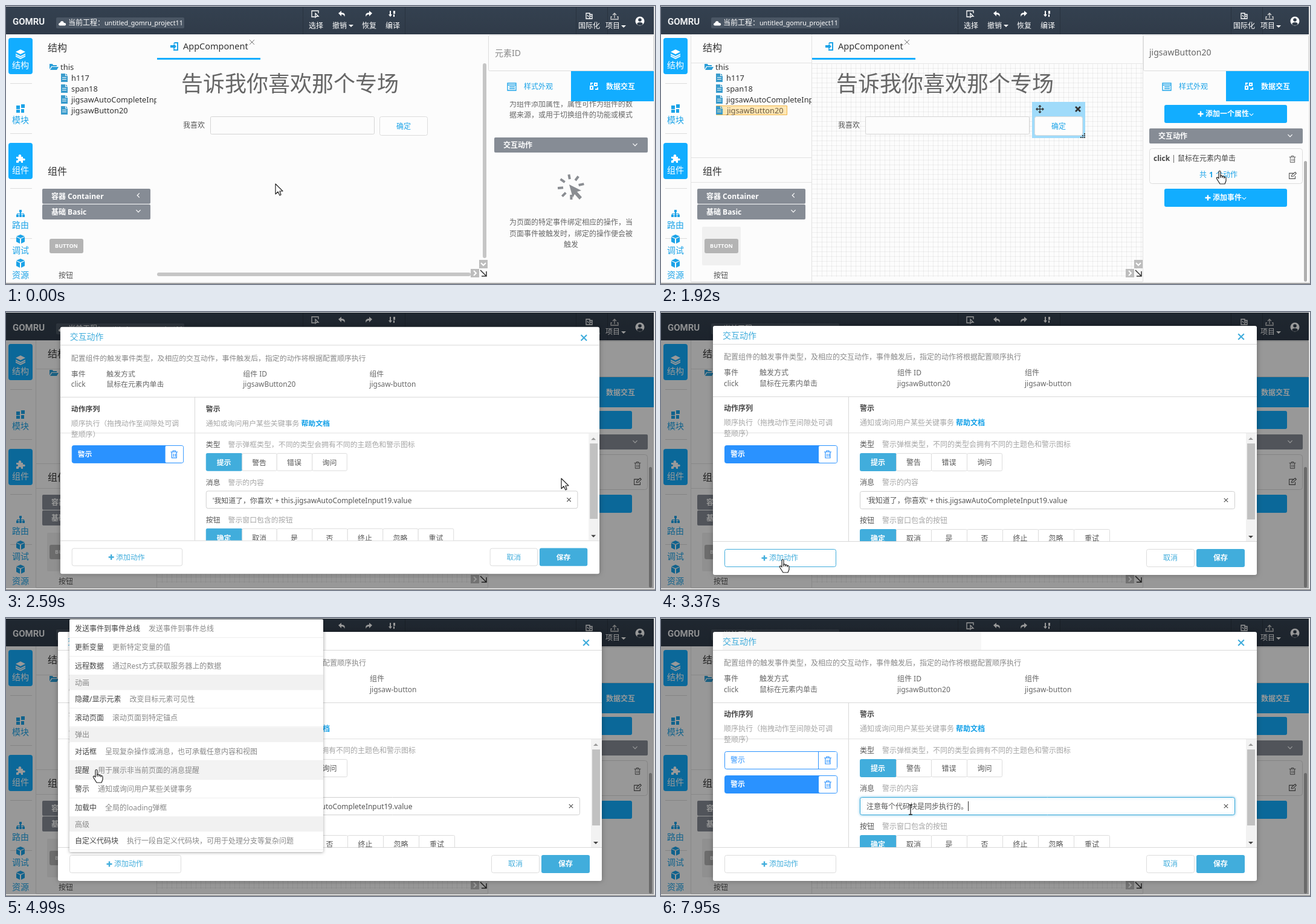
These frames come from a looping animation (1074x461 px, 8 s). An HTML page with a canvas:

```html
<!DOCTYPE html>
<html lang="zh-CN">
<head>
<meta charset="utf-8">
<title>交互动作</title>
<style>
html, body { margin: 0; width: 100%; height: 100%; overflow: hidden; background: #fcfcfc; }
canvas { display: block; width: 1074px; height: 461px; }
</style>
</head>
<body>
<canvas id="stage" width="1074" height="461"></canvas>
<script>
const c = document.getElementById('stage').getContext('2d');
const LOOP = 8000;
const FONT = '"Noto Sans", "Noto Sans CJK SC", "Noto Sans CJK", sans-serif';
const BLUE = '#12adff', SKY = '#41addc', ACTION = '#2a92ff', LINE = '#dcdcdc', TEXT = '#555', PALE = '#a5a5a5';

const clamp = v => Math.max(0, Math.min(1, v));
const span = (t, a, b) => clamp((t - a) / (b - a));
const smooth = p => p * p * (3 - 2 * p);

function box(x, y, w, h, fill, r = 0, stroke) {
  c.beginPath();
  const o = stroke ? .5 : 0;
  c.roundRect(x + o, y + o, w - 2 * o, h - 2 * o, r);
  if (fill) { c.fillStyle = fill; c.fill(); }
  if (stroke) { c.strokeStyle = stroke; c.lineWidth = 1; c.stroke(); }
}
const hline = (x1, x2, y, color = LINE) => box(x1, y, x2 - x1, 1, color);
const vline = (x, y1, y2, color = LINE) => box(x, y1, 1, y2 - y1, color);

function text(s, x, y, size = 12, color = TEXT, weight = 400, align = 'left') {
  c.font = `${weight} ${size}px ${FONT}`;
  c.fillStyle = color;
  c.textAlign = align;
  c.fillText(s, x, y + size * .37);
  return c.measureText(s).width;
}
const mid = (s, x, y, size, color, weight) => text(s, x, y, size, color, weight, 'center');

function clipped(x, y, w, h, draw) {
  c.save();
  c.beginPath();
  c.rect(x, y, w, h);
  c.clip();
  draw();
  c.restore();
}

// Icon paths are centred on 0,0.
const ICON = {
  layers: 'M0-7L8-3L0 1L-8-3ZM-8 0L0 4L8 0V2L0 6L-8 2ZM-8 3L0 7L8 3V5L0 9L-8 5Z',
  blocks: 'M-7-5H-1V1H-7ZM1-7H7V-1H1ZM-7 2H-1V7H-7ZM1 1H6V7H1Z',
  puzzle: 'M-7-3H-3C-5-8 3-8 1-3H4V0C9-2 9 5 4 3V7H1C2 3-4 3-3 7H-7V3C-3 4-3-1-7 0Z',
  tree: 'M-2-6H2V-2H1V0H6V2H7V6H3V2H5V1H1V2H2V6H-2V2H-1V1H-5V2H-3V6H-7V2H-6V0H-1V-2H-2Z',
  cube: 'M0-8L7-5L0-2L-7-5ZM-7-4L-1-1V7L-7 4ZM7-4L1-1V7L7 4Z',
  folder: 'M-7-5H-2L-1-3H5V-1H-4L-7 4ZM-3 0H8L5 5H-6Z',
  file: 'M-5-7H2V-3H6V7H-5ZM3-7L6-4H3ZM-3-1V0H4V-1ZM-3 2V3H4V2Z',
  cloud: 'M-4 4C-8 4-7-1-4-1C-3-6 3-5 3-1C8-2 8 4 4 4Z',
  undo: 'M-6-1L-1-5V-2C4-2 6 1 4 5C4 2 2 1-1 1V4Z',
  caret: 'M-4-2H4L0 2Z',
  caretUp: 'M-4 2H4L0-2Z',
  compile: 'M-4-5H-2V1H0L-3 5L-6 1H-4ZM2-5H5V0H2ZM2 1H4V5H2Z',
  door: 'M0-7H6V7H-2V4H0V5H4V-5H0V-3H-2V-5ZM-7-2H-2V-5L3 0L-2 5V2H-7Z',
  plus: 'M-1.2-4.5H1.2V-1.2H4.5V1.2H1.2V4.5H-1.2V1.2H-4.5V-1.2H-1.2Z',
  arrow: 'M0 0V17L4 13L7 19L9 18L7 12H12Z',
  hand: 'M-2 1C-2-1 1-1 1 1V8C3 6 4 8 4 9C6 7 7 9 7 10C9 9 10 10 10 12V16L8 21H0L-5 13C-7 10-4 9-2 12Z'
};
const LINES = {
  chevron: 'M-4-2L0 2L4-2',
  back: 'M2-4L-2 0L2 4',
  cross: 'M-4-4L4 4M4-4L-4 4',
  trash: 'M-6-4H6M-2-4V-6H2V-4M-4-4V6H4V-4M-1-1V4M2-1V4',
  edit: 'M3-4H-6V6H5V1M-2 2L-1-1L5-6L7-4L1 2Z',
  move: 'M-6 0H6M0-6V6M-2-4L0-6L2-4M-2 4L0 6L2 4M-4-2L-6 0L-4 2M4-2L6 0L4 2',
  select: 'M5-1V-5H-6V5H-1M0-1V6L2 4H5Z',
  upload: 'M0 3V-5M-3-2L0-5L3-2M-4 1H-6V5H6V1H4',
  locale: 'M-5-4H1V5H-5ZM1-2H5V5H1M-3-1L-1 2M2 1H4',
  list: 'M-7-6H7V6H-7ZM-7-3H7M-4 0H5M-4 3H5',
  swap: 'M-6 0H-2V5H-6ZM1-5H5V-1H1ZM-5-2V-5H-2M6 2V5H2'
};
function icon(name, x, y, color, size = 1, width = 1.3) {
  c.save();
  c.translate(x, y);
  c.scale(size, Math.abs(size));
  if (ICON[name]) {
    c.fillStyle = color;
    c.fill(new Path2D(ICON[name]), 'evenodd');
  } else {
    c.strokeStyle = color;
    c.lineWidth = width;
    c.stroke(new Path2D(LINES[name]));
  }
  c.restore();
}

function header() {
  const g = c.createLinearGradient(0, 0, 0, 47);
  g.addColorStop(0, '#344150');
  g.addColorStop(1, '#303b49');
  box(0, 0, 1074, 47, g);
  c.font = '700 15px Roboto, sans-serif';
  c.textAlign = 'left';
  c.fillStyle = '#eceef0';
  c.fillText('GOMRU', 11, 31);
  box(83, 19, 212, 18, '#4a5664', 2);
  icon('cloud', 93, 29, '#fff', .9);
  text('当前工程：', 103, 28, 12, '#fff');
  text('untitled_gomru_project11', 163, 28, 10.7, '#fff');
  for (const x of [491, 660, 943, 995]) vline(x, 2, 47, '#29333f');
  icon('select', 512, 13, '#fff');
  icon('undo', 556, 13, '#fff');
  icon('undo', 600, 13, '#fff', -1);
  icon('compile', 639, 13, '#fff');
  icon('locale', 965, 16, '#fff');
  icon('upload', 1007, 17, '#ccc');
  [['选择', 501], ['撤销', 540], ['恢复', 589], ['编译', 628], ['国际化', 947], ['项目', 992]]
    .forEach(([s, x]) => text(s, x, 33, 12, '#fff'));
  icon('caret', 571, 33, '#fff');
  icon('caret', 1022, 34, '#fff');
  c.fillStyle = '#fff';
  c.beginPath(); c.arc(1049, 25, 7.5, 0, 7); c.fill();
  c.fillStyle = '#323d4b';
  c.beginPath(); c.arc(1049, 23, 2.8, 0, 7); c.fill();
  c.beginPath(); c.ellipse(1049, 29.5, 4.6, 2.6, 0, 0, 7); c.fill();
}

function sidebar() {
  box(4, 53, 40, 60, BLUE, 4);
  box(4, 227, 40, 60, BLUE, 4);
  for (const y of [128, 211, 302, 385]) hline(7, 43, y);
  [['layers', 79, '结构', 98, 1], ['blocks', 170, '模块', 189], ['puzzle', 253, '组件', 272, 1],
   ['tree', 344, '路由', 363], ['cube', 387, '调试', 405], ['cube', 427, '资源', 446]]
    .forEach(([name, y, label, ty, on]) => {
      icon(name, 24, y, on ? '#fff' : '#1ba3e8');
      mid(label, 24, ty, 14, on ? '#fff' : '#1ba3e8');
    });
}

function treePanel(t) {
  text('结构', 69, 69, 16, '#333');
  icon('folder', 79, 101, '#2c9fd8');
  text('this', 90, 101, 13, '#333');
  const picked = t >= 1020, hover = t > 360 && t < 1230;
  if (picked) box(91, 165, 118, 16, '#ffe7b4', 0, '#f1b548');
  clipped(50, 95, 199, 90, () => ['h117', 'span18', 'jigsawAutoCompleteInput19', 'jigsawButton20']
    .forEach((s, i) => {
      const y = 119 + 18 * i;
      icon('file', 96, y, '#3a9ccd');
      const w = text(s, 108 + (picked && i == 3), y, 12.8, picked && i == 3 ? '#6b5d45' : '#333');
      if (hover && i == 3) hline(109, 109 + w, y + 7, '#666');
    }));
  text('组件', 69, 274, 16, '#333');
  [['容器 Container', 303, 'back'], ['基础 Basic', 329, 'chevron']].forEach(([s, y, mark]) => {
    box(60, y, 179, 25, '#868c95', 2);
    text(s, 75, y + 13, 12, '#fff', 600);
    icon(mark, 219, y + 11, '#fff', .9);
  });
}

function rightPanel(t) {
  const picked = t >= 1020;
  box(798, 48, 274, 60, '#fcfcfc', 2, LINE);
  t >= 1150 ? text('jigsawButton20', 808, 77, 14, '#666') : text('元素ID', 809, 78, 14, '#888');
  if (!picked) {
    clipped(799, 158, 270, 60, () => {
      mid('为组件添加属性，属性可作为组件的数', 935, 163, 12, '#666');
      mid('据来源，或用于切换组件的功能或模式', 935, 181, 12, '#666');
    });
    c.strokeStyle = '#8a8d92';
    c.lineWidth = 4;
    for (let i = 2; i < 9; i++) {
      const a = i * .75 + .05, x = Math.cos(a), y = Math.sin(a);
      c.beginPath();
      c.moveTo(935 + x * 13, 300 + y * 13);
      c.lineTo(935 + x * 22, 300 + y * 21);
      c.stroke();
    }
    c.fillStyle = '#8a8d92';
    c.fill(new Path2D('M932 296L952 306L945 308L953 317L949 321L941 312L938 318Z'));
    ['为页面的特定事件绑定相应的操作，当', '页面事件被触发时，绑定的操作便会被', '触发']
      .forEach((s, i) => mid(s, 935, 359 + 18.4 * i, 12, '#666'));
  } else {
    [['添加一个属性', 164], ['添加事件', 303]].forEach(([s, y], i) => {
      const color = t < 1150 && !i ? '#333' : '#fff';
      box(833, y, 203, 30, BLUE, 3);
      icon('plus', i ? 905 : 893, y + 15, color);
      const x = i ? 913 : 901, w = text(s, x, y + 15, 12, color, 600);
      icon('chevron', x + w + 4, y + 16, color, .8);
    });
    box(808, 236, 254, 59, '#fcfcfc', 4, LINE);
    let x = 815 + text('click', 815, 253, 12, '#444', 600);
    x += text(' | ', x, 253, 12, '#555');
    text('鼠标在元素内单击', x, 253, 12, '#444');
    text('共', 891, 280, 12, '#1ba3e8');
    text('1', 907, 280, 12, '#1ba3e8', 700);
    text('个动作', 918, 280, 12, '#1ba3e8');
    icon('trash', 1045, 254, '#555', .9, 1);
    icon('edit', 1045, 281, '#555', .9, 1.2);
    if (t >= 1150) box(1064, 257, 5, 200, '#b0b0b0', 3);
  }
  const y = picked ? 203 : 218;
  box(808, y, 254, 25, '#868c95', 2);
  text('交互动作', 823, y + 13, 12, '#fff', 600);
  icon('chevron', 1041, y + 12, '#fff', .9);
  box(935, 108, 137, 50, BLUE);
  icon('list', 837, 134, '#1ba3e8');
  text('样式外观', 857, 134, 12, '#1ba3e8');
  icon('swap', 973, 133, '#fff', 1, 2);
  text('数据交互', 993, 134, 12, '#fff', 600);
}

// Outlines, grid and tile of the editing state.
function editChrome() {
  c.fillStyle = 'rgba(0,0,0,.055)';
  for (let x = 258; x < 797; x += 8) c.fillRect(x, 95, 1, 354);
  for (let y = 95; y < 449; y += 8) c.fillRect(250, y, 547, 1);
  for (const x of [49, 249, 797]) vline(x, 47, 457, '#e2e2e2');
  for (const y of [94, 251, 292]) hline(50, 249, y, '#e2e2e2');
  hline(250, 797, 95, '#e6e6e6');
  hline(50, 797, 457, '#e2e2e2');
  box(68, 366, 64, 64, '#f0f0f0', 2);
}

function page(t) {
  box(0, 0, 1074, 461, '#fcfcfc');
  if (t >= 1150) editChrome();
  else if (t >= 1020) clipped(90, 159, 972, 243, editChrome);
  header();
  sidebar();
  treePanel(t);
  box(72, 386, 56, 24, '#b4b4b4', 3);
  mid('BUTTON', 100, 398, 9, '#fff', 600);
  text('按钮', 87, 447);

  icon('door', 279, 67, '#1ba3e8');
  text('AppComponent', 293, 67, 14.5, '#333');
  icon('cross', 407, 60, '#777', 1, 1);
  box(250, 86, 171, 3, BLUE);
  text('告诉我你喜欢那个专场', 290, 129, 36, '#666');
  text('我喜欢', 293, 198);
  box(338, 183, 272, 30, '#fcfcfc', 2, '#d5d5d5');
  if (t >= 1020) {
    box(614, 159, 88, 60, '#a0dbfa');
    icon('move', 627, 171, '#333');
    icon('cross', 690, 171, '#333', 1, 2.8);
    c.fillStyle = '#444';
    for (let i = 0; i < 3; i++) for (let j = 0; j <= i; j++) c.fillRect(700 - 3 * j, 211 + 3 * i, 2, 2);
  }
  box(618, 183, 80, 32, '#fdfdfd', 3, '#dcdcdc');
  mid('确定', 658, 200, 12, '#1ba3e8');
  if (t < 240) {
    box(789, 95, 6, 323, '#c6c6c6', 3);
    box(250, 442, 519, 6, '#c6c6c6', 3);
  }
  box(783, 421, 14, 14, '#bdbdbd');
  icon('chevron', 790, 428, '#fff', 1, 2);
  box(769, 436, 14, 14, '#bdbdbd');
  icon('back', 776, 443, '#fff', -1, 2);
  c.strokeStyle = '#333';
  c.lineWidth = 1.5;
  c.stroke(new Path2D('M785 438L795 448M795 440V448H787'));
  rightPanel(t);
}

// Window edge, never dimmed.
function windowEdge() {
  hline(0, 1074, 0, '#dfe1e3');
  box(1072, 0, 2, 458, '#e6e6e6');
  box(0, 458, 1074, 2, '#dcdcdc');
  hline(0, 1074, 460, '#777');
}

function segments(labels, y) {
  const edges = [329, 389, 447, 506, 565, 624, 683, 743];
  labels.forEach((s, i) => {
    const x = edges[i], w = edges[i + 1] - x;
    box(x, y, w + (i < labels.length - 1), 30, i ? '#fff' : SKY, 2, i ? LINE : SKY);
    mid(s, x + w / 2, y + 16, 12, i ? TEXT : '#fff', i ? 400 : 600);
  });
}

function actionRow(y, on) {
  box(105, y, 187, 30, on ? ACTION : '#fff', 3, ACTION);
  box(261, y + 1, 30, 28, '#fff', 2);
  vline(260, y, y + 30, ACTION);
  text('警示', 115, y + 15, 12, on ? '#fff' : ACTION, on ? 600 : 400);
  icon('trash', 276, y + 15, ACTION, 1, 1.2);
}

function messageField(t) {
  const focus = t >= 7100, second = t >= 6320;
  c.save();
  if (focus) { c.shadowColor = 'rgba(65,173,220,.6)'; c.shadowBlur = 4; }
  box(329, 297, 621, 30, '#fff', 3, focus ? SKY : '#d0d0d0');
  c.restore();
  let w = 0;
  if (!second) text("'我知道了，你喜欢' + this.jigsawAutoCompleteInput19.value", 340, 313);
  else if (t >= 7460) w = text('注意每个代码块是同步执行的。', 340, 313);
  if (focus) vline(Math.round(340 + w), 304, 320, '#333');
  if (!second || t >= 7460) icon('cross', 935, 312, '#555', .8, 1.5);
}

function dialog(t) {
  c.save();
  c.shadowColor = 'rgba(0,0,0,.3)';
  c.shadowBlur = 8;
  box(86, 23, 900, 413, '#fff', 3);
  c.restore();
  if (t > 3520) box(102, 23, 428, 30, '#f7f7f7');
  text('交互动作', 102, 39, 14, SKY);
  icon('cross', 960, 41, SKY, 1.2, 1.8);
  for (const y of [53, 140, 380]) hline(86, 986, y, '#d8d8d8');
  text('配置组件的触发事件类型，及相应的交互动作，事件触发后，指定的动作将根据配置顺序执行', 104, 75, 12, '#888');
  [['事件', 'click', 104], ['触发方式', '鼠标在元素内单击', 163], ['组件 ID', 'jigsawButton20', 391], ['组件', 'jigsaw-button', 602]]
    .forEach(([k, v, x]) => { text(k, x, 101, 12, '#666'); text(v, x, 119, 12, '#666'); });
  vline(310, 140, 380, '#d8d8d8');
  hline(86, 986, 200, '#e2e2e2');
  text('动作序列', 104, 160, 12, '#444', 600);
  text('顺序执行（拖拽动作至间隙处可调', 104, 184, 12, PALE);
  text('整顺序）', 104, 202, 12, PALE);
  const second = t >= 6320;
  actionRow(221, !second);
  if (t >= 5800) actionRow(261, second);

  text('警示', 329, 160, 12, '#444', 600);
  text('通知或询问用户某些关键事务', 329, 184, 12, PALE);
  text('帮助文档', 488, 184, 12, '#12a0e8', 600);
  [['类型', '警示弹框类型，不同的类型会拥有不同的主题色和警示图标', 220],
   ['消息', '警示的内容', 283], ['按钮', '警示窗口包含的按钮', 346]]
    .forEach(([k, v, y]) => { text(k, 329, y); text(v, 366, y, 12, PALE); });
  segments(['提示', '警告', '错误', '询问'], 234);
  messageField(t);
  clipped(311, 350, 655, 30, () => segments(['确定', '取消', '是', '否', '终止', '忽略', '重试'], 360));
  box(968, 201, 17, 179, '#f2f2f2');
  box(970, 218, 13, 126, '#c1c1c1');
  icon('caretUp', 976, 210, '#999');
  icon('caret', 976, 373, '#444');

  const hot = t > 3100 && t < 4060;
  box(105, 393, 185, 30, '#fff', 3, hot ? SKY : LINE);
  icon('plus', 171, 408, SKY);
  text('添加动作', 179, 408, 12, SKY);
  box(803, 393, 80, 30, '#fff', 3, LINE);
  mid('取消', 843, 408, 12, SKY);
  box(886, 393, 80, 30, SKY, 3);
  mid('保存', 926, 408, 12, '#fff', 600);
}

const MENU = [
  ['发送事件到事件总线', '发送事件到事件总线'], ['更新变量', '更新特定变量的值'],
  ['远程数据', '通过Rest方式获取服务器上的数据'], ['动画'],
  ['隐藏/显示元素', '改变目标元素可见性'], ['滚动页面', '滚动页面到特定锚点'], ['弹出'],
  ['对话框', '呈现复杂操作或消息，也可承载任意内容和视图'], ['提醒', '用于展示非当前页面的消息提醒'],
  ['警示', '通知或询问用户某些关键事务'], ['加载中', '全局的loading弹框'], ['高级'],
  ['自定义代码块', '执行一段自定义代码块，可用于处理分支等复杂问题']
];
function menu(t, cursorY) {
  const shown = span(t, 3520, 3740) * (1 - span(t, 5730, 5840));
  if (!shown) return;
  c.save();
  c.globalAlpha = shown;
  c.save();
  c.shadowColor = 'rgba(0,0,0,.35)';
  c.shadowBlur = 5;
  c.shadowOffsetY = 1;
  box(105, 2, 420, 386, '#fff', 2);
  c.restore();
  let y = 2;
  for (const [name, note] of MENU) {
    const h = note ? 31 : 24.4;
    if (!note) {
      box(105, y, 420, h, '#f1f1f1');
      text(name, 114, y + 12.5, 12, '#888');
    } else {
      if (t > 4030 && cursorY >= y && cursorY < y + h) box(105, y, 420, h, '#f3f3f3');
      const w = text(name, 114, y + 15.5, 12, '#444');
      text(note, 128 + w, y + 15.5, 12, '#888');
      hline(105, 525, Math.round(y + h - 1), '#eee');
    }
    y += h;
  }
  c.restore();
}

// Cursor stops: time, x, y.
const PATH = [
  [60, 446, 295], [420, 177, 171], [660, 177, 171], [840, 172, 169], [1200, 172, 169],
  [1800, 925, 274], [1920, 925, 274], [2040, 919, 276], [2650, 919, 276], [3130, 205, 410],
  [3190, 205, 410], [3480, 200, 411], [3800, 198, 409], [3970, 186, 388], [4810, 150, 252],
  [4990, 150, 252], [5170, 150, 282], [5730, 150, 282], [6150, 153, 273], [6500, 142, 274],
  [6560, 142, 274], [7060, 455, 315], [7830, 455, 315], [7950, 413, 318]
];
function cursorAt(t) {
  const i = PATH.findIndex(k => k[0] > t);
  if (i < 1) return PATH[i < 0 ? PATH.length - 1 : 0].slice(1);
  const [a, x, y] = PATH[i - 1], [b, u, v] = PATH[i], p = smooth(span(t, a, b));
  return [x + (u - x) * p, y + (v - y) * p];
}
const HAND = [[360, 1230], [1790, 2350], [3080, 3900], [4060, 5760], [6000, 6660]];

function cursor(t, x, y) {
  c.save();
  c.translate(Math.round(x), Math.round(y));
  c.lineJoin = 'round';
  if (t >= 6960) {
    c.strokeStyle = '#222';
    c.lineWidth = 1.3;
    c.stroke(new Path2D('M-3-8H3M0-8V8M-3 8H3'));
  } else {
    const hand = HAND.some(([a, b]) => t >= a && t < b);
    const p = new Path2D(ICON[hand ? 'hand' : 'arrow']);
    c.fillStyle = '#fff';
    c.strokeStyle = '#222';
    c.lineWidth = 1.2;
    c.fill(p);
    c.stroke(p);
    if (hand) c.stroke(new Path2D('M1 7V11M4 8V11M7 9V12'));
  }
  c.restore();
}

function draw(t) {
  const [x, y] = cursorAt(t);
  page(t);
  const open = span(t, 2350, 2605);
  if (open) box(0, 0, 1074, 461, `rgba(0,0,0,${.4 * Math.min(1, open * 1.5)})`);
  windowEdge();
  if (open) {
    const s = smooth(open);
    c.save();
    c.globalAlpha = Math.min(1, 1.3 * open ** 3);
    c.translate(536, 230);
    c.scale(s, s);
    c.translate(-536, -230);
    dialog(t);
    c.restore();
    menu(t, y);
  }
  cursor(t, x, y);
}

const start = performance.now();
function tick() {
  draw((performance.now() - start) % LOOP);
  requestAnimationFrame(tick);
}
tick();
</script>
</body>
</html>
```
